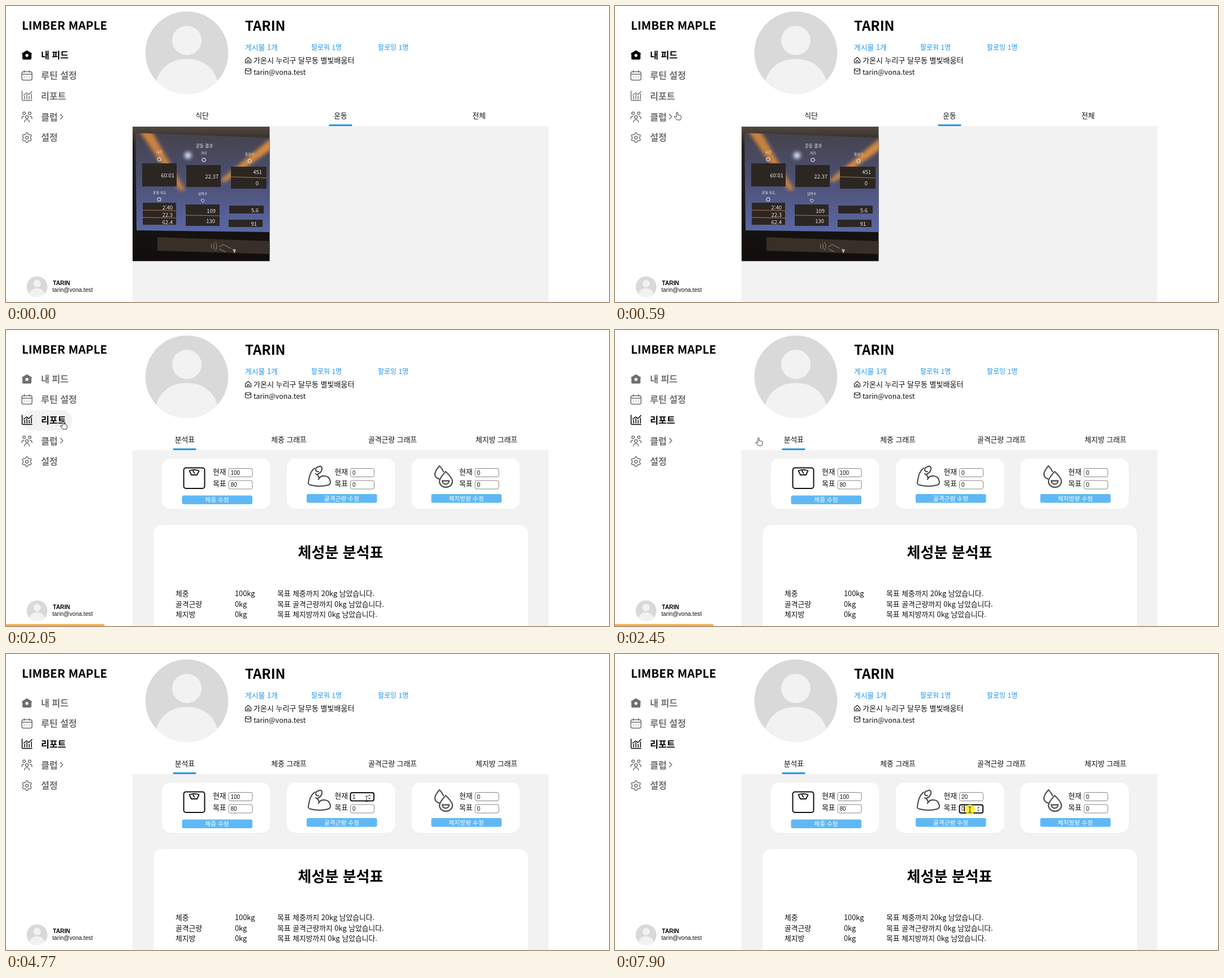
Animation of 1067x525 px, one loop 8 s. Source, as an HTML page:

```html
<!DOCTYPE html>
<html lang="ko">
<head>
<meta charset="utf-8">
<title>Report page</title>
<style>
html, body { margin: 0; width: 100%; height: 100%; overflow: hidden; background: #fff; }
svg { display: block; font-family: "Noto Sans CJK KR", "Noto Sans", sans-serif; }
.b { font-weight: 700; }
.m { text-anchor: middle; }
.arial { font-family: "Liberation Sans", Arial, sans-serif; }
.line { fill: none; stroke-linecap: round; stroke-linejoin: round; }
</style>
</head>
<body>
<svg id="stage" width="1067" height="525" viewBox="0 0 1067 525"></svg>
<script>
// Text is placed by its left edge (or middle) and the vertical centre of its glyphs.
const text = (x, cy, s, size = 12.8, cls = '', fill = '#111') =>
  `<text x="${x}" y="${cy + size * .37}" font-size="${size}" class="${cls}" fill="${fill}">${s}</text>`;
const box = (x, y, w, h, fill, r = 0, more = '') =>
  `<rect x="${x}" y="${y}" width="${w}" height="${h}" rx="${r}" fill="${fill}" ${more}/>`;
const line = (d, stroke = 'currentColor', width = 1.5, more = '') =>
  `<path class="line" d="${d}" stroke="${stroke}" stroke-width="${width}" ${more}/>`;
const ring = (x, y, r) =>
  `<circle cx="${x}" cy="${y}" r="${r}" fill="none" stroke="currentColor" stroke-width="1.5"/>`;
const poly = (points, fill, more = '') => `<polygon points="${points}" fill="${fill}" ${more}/>`;

const BLUE = '#2196ea', GREY = '#707070', PANEL = '#f2f2f2';
const NAME = 'TARIN', MAIL = 'tarin@vona.test';

const avatar = (x, y, scale) => `<g transform="translate(${x} ${y}) scale(${scale})" clip-path="url(#disc)">
  <circle r="73.5" fill="#d9d9d9"/><circle cy="-22" r="26" fill="${PANEL}"/>
  <path d="M-56 60C-52 29-31 11 0 11S52 29 56 60V80H-56z" fill="${PANEL}"/></g>`;

function gear(cx, cy) {
  let d = '';
  for (let i = 0; i < 72; i++) {
    const a = i * Math.PI / 36, r = 7.5 + 1.3 * Math.cos(6 * a + Math.PI);
    d += (i ? 'L' : 'M') + (cx + r * Math.cos(a)).toFixed(1) + ' ' + (cy + r * Math.sin(a)).toFixed(1);
  }
  return line(d + 'z') + ring(cx, cy, 2.6);
}

const item = (id, label, y, icon) =>
  `<g id="${id}" color="${GREY}">${icon}${text(62, y, label, 16, 'b', 'currentColor')}</g>`;

const sidebar = () => text(28, 34, 'LIMBER MAPLE', 20.5, 'b', '#000') +
  box(28, 142, 89, 36.5, PANEL, 18, 'id="hover"') +
  item('feed', '내 피드', 87,
    `<path fill="currentColor" fill-rule="evenodd" d="M37 78.5l9 5.5-1 2v7q0 2-2 2H31q-2 0-2-2v-7l-1-2zM37 85a2.7 2.7 0 1 0 .01 0z"/>`) +
  item('routine', '루틴 설정', 123.5,
    line('M31 116.5h12q3 0 3 3v9q0 3-3 3H31q-3 0-3-3v-9q0-3 3-3zM28 121h18M32.500 114.500v3M41.500 114.500v3M33 126h.1M37 126h.1M41 126h.1')) +
  item('report', '리포트', 160,
    line('M28.500 151v14.500q0 2 2 2H46M33 165v-5M37 165v-8M41 165v-5M45 165v-9M31.500 158l5-4 4 3 5.500-5.500')) +
  item('club', '클럽', 197,
    ring(32, 190.3, 2.3) + ring(42, 190.3, 2.3) + ring(37, 197, 2.6) +
    line('M28 200q0-4 3.500-4.500M46 200q0-4-3.500-4.500M32.500 206a4.500 4.500 0 0 1 9 0') +
    line('M96.500 192l4 4.200-4 4.200')) +
  item('setting', '설정', 233.5, gear(37, 233.5)) +
  avatar(55, 498, .253) +
  text(83, 491.5, NAME, 10.2, 'b arial', '#000') + text(82, 503.5, MAIL, 10.2, 'arial');

const header = () => avatar(320, 83, 1) +
  text(423, 35.5, NAME, 24, 'b', '#000') +
  text(423, 73.5, '게시물 1개', 12.8, '', BLUE) +
  text(540, 74, '팔로워 1명', 12, '', BLUE) +
  text(658, 74, '팔로잉 1명', 12, '', BLUE) +
  text(438, 96.5, '가온시 누리구 달무동 별빛배움터', 13) +
  text(438, 117, MAIL, 12.4) +
  line('M423.500 95.500l5-4.500 5 4.500v5.500h-10zM426.500 101v-3q2-2 4 0v3', '#222', 1.2) +
  line('M425 111h7q1.500 0 1.500 1.500v6.500q0 1.500-1.500 1.500h-7q-1.500 0-1.500-1.500v-6.500q0-1.500 1.500-1.500zM424 113l4.500 3 4.500-3', '#222', 1.2);

const tabs = list => list.map(([x, s]) => text(x, 194, s, 12.8, 'm')).join('');

function photo() {
  const panels = [[241, 279, 61, 41], [319, 282, 61, 39], [398, 285, 63, 39], [242, 349, 59, 39],
    [318, 352, 60, 38], [395, 354, 61, 14], [394, 379, 60, 13]];
  const figures = [[298, 300, '60:01'], [376, 302, '22.37'], [453, 294, '451'], [447, 314, '0'], [295, 357, '2:40'],
    [295, 370, '22.3'], [295, 383, '62.4'], [371, 363, '109'], [370, 381, '130'], [447, 362, '5.6'], [444, 386, '91']];
  const heads = [[351, 248, '운동 결과'], [271, 259, '시간'], [350, 261, '거리'], [431, 263, '칼로리'],
    [272, 331, '운동 속도'], [348, 333, '심박수']];
  return `<g clip-path="url(#shot)">` + box(224, 214, 243, 239, 'url(#case)') +
    poly('229,225 467,234 467,401 231,398', 'url(#screen)') +
    `<g clip-path="url(#glass)"><g filter="url(#soft)">` +
    poly('236,222 258,222 318,328 306,326', '#c9823f') +
    poly('470,234 470,254 388,312 378,310', '#d58a3f') +
    `<circle cx="322" cy="265" r="6" fill="#dfe6ff"/></g></g>` +
    panels.map(([x, y, w, h]) => box(x, y, w, h, '#2c2623')).join('') +
    line('M398 303l63 2M242 362l59 1M242 375l59 1M318 371l60 1', '#b8773d', 1) +
    figures.map(([x, y, s]) => `<g text-anchor="end">${text(x, y, s, 9.5, '', '#e4e4ea')}</g>`).join('') +
    heads.map(([x, y, s]) => text(x, y, s, y < 250 ? 7.5 : 6, 'm', '#eee')).join('') +
    `<g color="#ddd" stroke-opacity=".8">${ring(271, 272, 3)}${ring(350, 273, 3)}${ring(431, 275, 3)}${ring(271, 343, 3)}</g>` +
    line('M348 348l-3-3q0-3 3-2q3-1 3 2z', '#ddd', 1) +
    poly('268,410 467,417 467,440 268,434', '#382f29') +
    line('M363 423q2 3 0 6M367 421q3 5 0 10M371 419q4 7 0 14M378 427l6-4 14 7M378 431l10 5', '#85796e', 1.2) +
    poly('401,431 407,432 404,439', '#d9aa78') + `</g>`;
}

const field = (x, y, value, id = '') =>
  box(x, y, 42, 15, '#fff', 3, `stroke="#858585" id="${id}Box"`) +
  `<g id="${id}">${text(x + 3.5, y + 7.5, value, 10, 'arial')}</g>`;

const card = (x, inner, now, goal, label, button, buttonY, id) => box(x, 228, 191.5, 89, '#fff', 15) +
  text(inner - 27.5, 251.5, '현재') + text(inner - 27.5, 272.5, '목표') +
  field(inner + .5, 245.5, now, id + 'now') + field(inner + .5, 267, goal, id + 'goal') +
  box(inner - 82 + (inner > 400 ? 5 : 0), buttonY, 124.5, 15.5, '#5fb8f6', 3) +
  text(inner - 20 + (inner > 400 ? 5 : 0), buttonY + 7.7, button, 10.7, 'm', '#fff');

const rows = [['체중', '100kg', '목표 체중까지 20kg 남았습니다.'],
  ['골격근량', '0kg', '목표 골격근량까지 0kg 남았습니다.'],
  ['체지방', '0kg', '목표 체지방까지 0kg 남았습니다.']];

const feedPage = () => `<g id="feedPage">` +
  tabs([[347, '식단'], [592, '운동'], [837, '전체']]) + box(571.5, 210, 41, 3, BLUE, 1) + photo() + `</g>`;

const reportPage = () => `<g id="reportPage">` +
  tabs([[316.5, '분석표'], [500.5, '체중 그래프'], [684, '골격근량 그래프'], [868, '체지방 그래프']]) +
  box(295.5, 210, 41, 3, BLUE, 1) +
  card(276, 393.5, '100', '80', '', '체중 수정', 293.5, 'weight') +
  card(497, 609, '0', '0', '', '골격근량 수정', 291, 'muscle') +
  card(717.5, 829.5, '0', '0', '', '체지방량 수정', 291, 'fat') +
  box(314.5, 244.5, 37, 36.5, 'none', 4, 'stroke="#111" stroke-width="2"') +
  line('M324.500 249.500q8.500-3 17 0l-3.500 7.500h-10zM331 250l2.500 4', '#111', 1.8) +
  line('M553 251q-4 1-5-3q0-4 4-5l4-1.500q4 1 3 6q-1 5-7 8M546 245q-7 6-9 15l-2 10q-1 4 4 5q16 4 31 0q4-1 4-6q-2-10-10-10q-8-1-11 6M554 263q-1-6-6-8', '#444', 2) +
  line('M766 264a8 8 0 0 1-7-8q0-6 8-15q5 5 7 10', '#555', 2.3) +
  line('M778 251q-11 12-11 17.500a11.500 10.500 0 0 0 23 0q0-6-12-17.500zM772 267.500h12a6 6 0 0 1-12 0z', '#555', 2.3) +
  box(261.5, 346, 662, 200, '#fff', 15) +
  text(592, 394, '체성분 분석표', 26, 'b m', '#000') +
  rows.map((r, i) => [300, 405, 480].map((x, j) => text(x, 467.5 + 18.5 * i, r[j])).join('')).join('') +
  `<g id="focus">` + box(609.5, 246, 41.5, 14.5, 'none', 3, 'stroke="#111" stroke-width="2"') +
  poly('640.5,252 645.5,252 643,249.5', '#555') + poly('640.5,255 645.5,255 643,257.5', '#555') + `</g>` +
  box(0, 247, 1, 12, '#111', 0, 'id="caret"') + `</g>`;

const pointers = `<g id="pointer">
  <path id="arrow" d="M0 0V10.500L2.400 8.400 4 12 5.700 11.300 4.100 7.700H7z" fill="#fff" stroke="#222" stroke-width=".9"/>
  <path id="hand" d="M-1.200 1Q0-.8 1.200 1V5.500Q2.500 4.500 3.500 6Q5 5.200 5.800 6.700Q7 6.500 7 8V10.500Q7 12 5.700 14H-.5L-4.500 9Q-5 7.300-3.500 7.500L-1.200 9z" fill="#fff" stroke="#222" stroke-width=".9"/>
  <path id="beam" class="line" d="M-2-5Q0-5 0-4Q0-5 2-5M0-4V4M-2 5Q0 5 0 4Q0 5 2 5" stroke="#222"/></g>`;

stage.innerHTML = `<defs>
  <clipPath id="disc"><circle r="73.5"/></clipPath>
  <clipPath id="shot"><rect x="224" y="214" width="242.5" height="238.5"/></clipPath>
  <clipPath id="glass"><polygon points="229,225 467,234 467,401 231,398"/></clipPath>
  <filter id="soft"><feGaussianBlur stdDeviation="3"/></filter>
  <linearGradient id="case" x2="0" y2="1"><stop stop-color="#51473f"/><stop offset=".15" stop-color="#26211e"/><stop offset="1" stop-color="#100d0b"/></linearGradient>
  <linearGradient id="screen" x2="0" y2="1"><stop stop-color="#45434c"/><stop offset=".45" stop-color="#4b4f70"/><stop offset="1" stop-color="#5a68a6"/></linearGradient>
  </defs>` + sidebar() + header() + box(224, 213, 736, 312, PANEL) + feedPage() + reportPage() +
  box(-5, 521.5, 179.5, 10, '#fcab45', 3, 'id="status"') +
  `<circle id="click" r="9" fill="#ffe81c" fill-opacity=".85"/>` + pointers;

const $ = id => document.getElementById(id);
const show = (id, on) => { $(id).style.opacity = +on; };

// Pointer path: time, x, y, and shape used until the next stop.
const path = [
  [460, 784, 447, 'arrow'], [590, 110, 188, 'hand'], [650, 110, 188, 'hand'], [1120, 101, 162, 'hand'],
  [2320, 101, 162, 'hand'], [2450, 254, 191, 'hand'], [2520, 254, 191, 'arrow'], [2800, 460, 238, 'arrow'],
  [3120, 437, 260, 'arrow'], [3450, 437, 260, 'arrow'], [3700, 545, 264, 'arrow'], [3900, 612, 254, 'beam'],
  [4000, 638, 252, 'arrow'], [4050, 641, 250, 'arrow'], [4510, 641, 250, 'arrow'], [4640, 645, 256, 'arrow'],
  [4770, 638, 257, 'beam'], [4840, 638, 257, 'beam'], [5050, 623, 256, 'beam'], [5310, 637, 258, 'beam'],
  [5370, 636, 258, 'beam'], [5510, 636, 258, 'beam'], [5710, 639, 258, 'beam'], [7630, 639, 258, 'beam'],
  [7830, 628, 276, 'beam'], [8000, 628, 276, 'beam']];

const clicks = [[1780, 2050], [4110, 4240], [7830, 8000]];
const typed = [[0, '0'], [4110, '1'], [6240, ''], [6970, '2'], [7100, '20']];
const carets = [[5710, 6240, 618], [6240, 6770, 611], [6970, 7100, 618], [7100, 7630, 623.5], [7830, 8000, 618]];
const during = t => ([from, to]) => t >= from && t < to;

function movePointer(t) {
  const i = path.findLastIndex(p => t >= p[0]);
  show('pointer', i >= 0);
  if (i < 0) return;
  const [t0, x0, y0, shape] = path[i], [t1, x1, y1] = path[i + 1];
  const u = (t - t0) / (t1 - t0), k = u * u * (3 - 2 * u);
  const x = x0 + (x1 - x0) * k, y = y0 + (y1 - y0) * k;
  $('pointer').setAttribute('transform', `translate(${x} ${y})`);
  $('click').setAttribute('transform', `translate(${x} ${y})`);
  for (const id of ['arrow', 'hand', 'beam']) show(id, id === shape);
}

function draw(now) {
  const t = now % 8000, report = t >= 2050, second = t >= 7830;
  movePointer(t);
  show('click', clicks.some(during(t)));
  show('feedPage', !report);
  show('reportPage', report);
  $('feed').setAttribute('color', report ? GREY : '#000');
  $('report').setAttribute('color', report ? '#000' : GREY);
  show('hover', t < 2320 ? Math.min(1, Math.max(0, (t - 850) / 150)) : 0);
  show('status', t >= 850 && t < 2780);

  $('musclenow').firstChild.textContent = typed.findLast(e => t >= e[0])[1];
  show('focus', t >= 4110);
  $('focus').setAttribute('transform', `translate(0 ${second ? 21.5 : 0})`);
  const caret = carets.find(during(t));
  show('caret', !!caret);
  if (caret) $('caret').setAttribute('transform', `translate(${caret[2]} ${second ? 21.5 : 0})`);
  requestAnimationFrame(draw);
}
requestAnimationFrame(draw);
</script>
</body>
</html>
```
